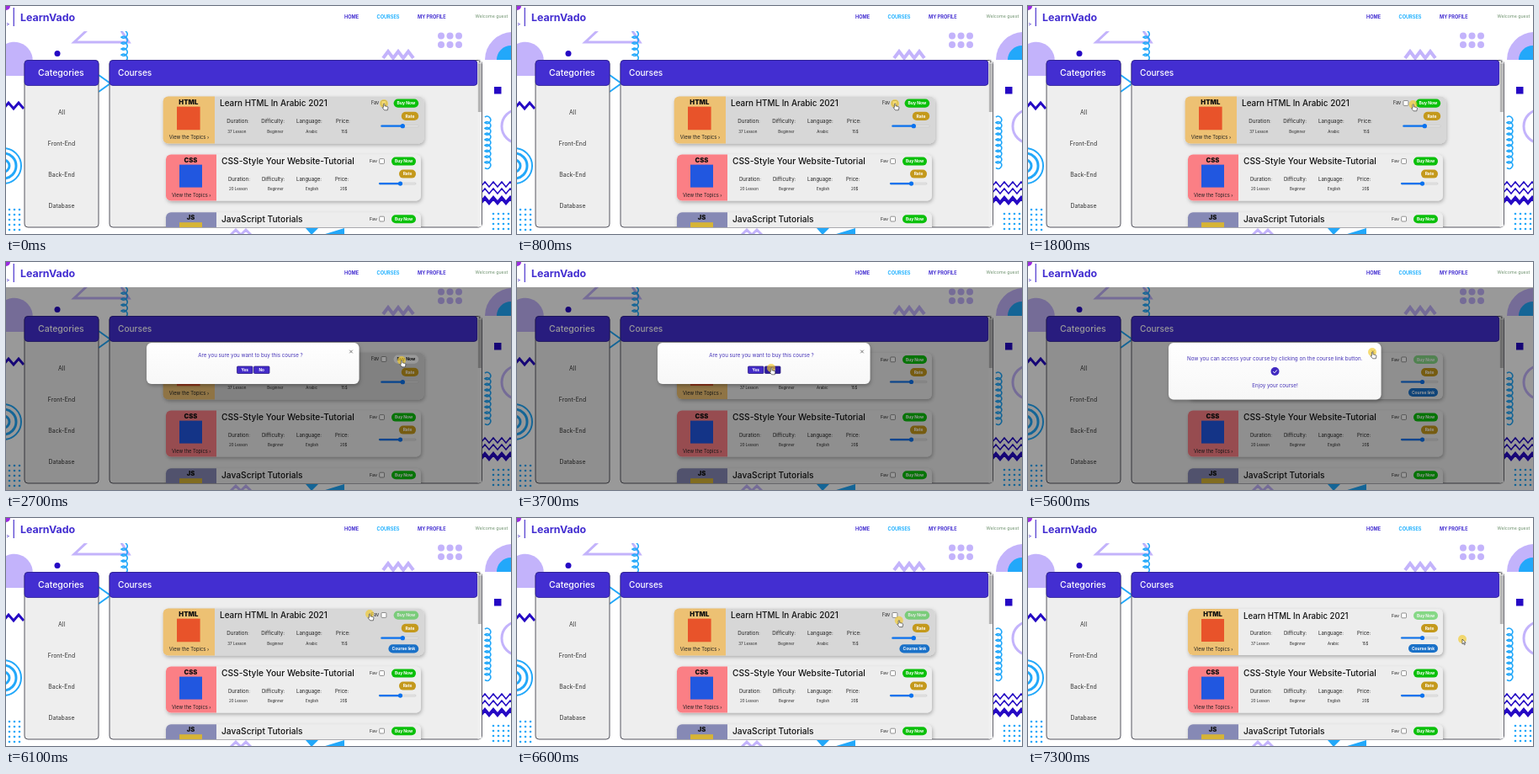
Write an HTML page that moves like this. It is 600 px wide and 271 px high and loops after 7.4 s.

```html
<!DOCTYPE html>
<html lang="en">
<head>
<meta charset="utf-8">
<title>Course page</title>
<style>
html, body { margin: 0; width: 100%; height: 100%; overflow: hidden; background: #fff; }
svg { display: block; width: 100vw; height: 100vh; }
text { font-family: Inter, "Open Sans", sans-serif; }
</style>
</head>
<body>
<svg id="stage" viewBox="0 0 600 271" preserveAspectRatio="none" xmlns="http://www.w3.org/2000/svg"></svg>
<script>
const LOOP = 7400, STEP = 100;
const PURPLE = '#432ed1', LAVENDER = '#c3b3fb', CYAN = '#22a8fa', NAVY = '#2509c4';

const rect = (x, y, w, h, fill, r = 0, extra = '') =>
  `<rect x="${x}" y="${y}" width="${w}" height="${h}" rx="${r}" fill="${fill}" ${extra}/>`;
const text = (s, x, y, size, fill = '#222', extra = '') =>
  `<text x="${x}" y="${y}" font-size="${size}" fill="${fill}" ${extra}>${s}</text>`;
const mid = (s, x, y, size, fill, extra = '') => text(s, x, y, size, fill, `text-anchor="middle" ${extra}`);
const line = (d, color, width = 2, extra = '') =>
  `<path d="${d}" fill="none" stroke="${color}" stroke-width="${width}" ${extra}/>`;
const shape = (d, fill) => `<path d="${d}" fill="${fill}"/>`;
const ring = (x, y, r, color, width) =>
  `<circle cx="${x}" cy="${y}" r="${r}" fill="none" stroke="${color}" stroke-width="${width}"/>`;
const BOLD = 'font-weight="700"', MEDIUM = 'font-weight="500"';

function pill(label, x, y, w, fill, attrs = '') {
  return `<g ${attrs}>${rect(x, y, w, 10, fill, 5)}${mid(label, x + w / 2, y + 6.7, 4.9, '#fff', BOLD)}</g>`;
}

function dots(x, y, cols, rows, gap = 6, r = 1.3, color = CYAN) {
  let out = '';
  for (let i = 0; i < cols * rows; i++)
    out += `<circle cx="${x + i % cols * gap}" cy="${y + Math.floor(i / cols) * gap}" r="${r}" fill="${color}"/>`;
  return out;
}

function zigzag(x, y, count, dx, dy) {
  let d = `M${x} ${y}`;
  for (let i = 0; i < count; i++) d += `l${dx} ${i % 2 ? dy : -dy}`;
  return d;
}

const coil = (x, y, turns, r) => `M${x} ${y}` + `a${r} ${r} 0 1 1 0 ${r * 1.6}`.repeat(turns);

function background() {
  return rect(0, 0, 600, 271, '#fff') +
    shape('M0 45a22 22 0 0 1 22 38H0z', LAVENDER) +
    line('M97 28L81 43H146L136 28', LAVENDER, 3) +
    `<circle cx="61" cy="56.5" r="3.5" fill="${NAVY}"/>` +
    line(coil(137, 30, 5, 4.4), CYAN, 1.6) +
    line('M110 82L124 92L110 102', CYAN, 2) +
    line(zigzag(-3, 122, 4, 6, 7), NAVY, 3) +
    ring(-3, 190, 7, CYAN, 3) + ring(-3, 190, 15, CYAN, 3) + ring(-3, 190, 21, CYAN, 2) +
    dots(4, 242, 3, 5) +
    line(zigzag(267, 272, 4, 6, 6), LAVENDER, 3) +
    shape('M356 264H371L363 272zM376 272L402 264V272z', CYAN) +
    line(zigzag(448, 62, 6, 6, 8), LAVENDER, 4) +
    dots(517, 35.5, 3, 2, 10.5, 4, LAVENDER) +
    shape('M569 64a33 33 0 0 1 33 -33V64z', LAVENDER) +
    shape('M583 64a17 17 0 0 1 17 -17V64z', CYAN) +
    rect(580, 96, 8.5, 8.5, NAVY) +
    ring(609, 143, 20, LAVENDER, 3) +
    line(coil(569, 132, 9, 4.2), CYAN, 1.6) +
    line(zigzag(564, 215, 8, 5, 6), NAVY, 1.5) +
    line(zigzag(564, 223, 8, 5, 6), NAVY, 1.5) +
    line(zigzag(564, 234, 8, 5, 6), NAVY, 4) +
    dots(579, 247, 4, 4);
}

function header() {
  const nav = [['HOME', 402, PURPLE], ['COURSES', 440.5, '#1fb0ff'], ['MY PROFILE', 489, PURPLE]];
  return rect(0, 0, 600, 30, '#fff') +
    shape('M0 0H5a5 5 0 0 1 -5 5z', '#9c2be0') + text('s&gt;', -3, 24, 6, NAVY) +
    rect(8.7, 2, 1, 22, NAVY) +
    text('LearnVado', 17, 18, 12.4, PURPLE, BOLD) +
    nav.map(([s, x, c]) => text(s, x, 14.7, 5.6, c, BOLD)).join('') +
    text('Welcome guest', 557.5, 14.2, 5.3, '#6d916d');
}

function panel(x, w, headW, title, titleX, size) {
  return rect(x, 64.5, w, 198.5, '#eeeeee', 4, 'stroke="#55555f" stroke-width="1"') +
    rect(x, 64.5, headW, 30, PURPLE, 4, 'stroke="#2b1d96" stroke-width=".8"') +
    text(title, titleX, 83.2, size, '#fff', MEDIUM);
}

// Laid out for the first row; later rows are shifted down.
function card(c, dy, id) {
  const labels = [['Duration:', 264, 265, c.lessons], ['Difficulty:', 304, 311, 'Beginner'],
    ['Language:', 345, 356, c.language], ['Price:', 391, 397, c.price]];
  return `<g transform="translate(0 ${dy})"><g id="${id}">` +
    rect(190, 108, 303, 55, '#ededed', 6, 'class="face" filter="url(#shadow)"') +
    shape('M250 108H196a6 6 0 0 0 -6 6V157a6 6 0 0 0 6 6H250z', c.panel) +
    mid(c.name, 219.5, 117.3, 7.6, '#111', 'font-weight="900"') +
    rect(206, 120, 27, 27, c.mark) +
    text('View the Topics ›', 197, 158, 5.7) +
    text(c.title, 256, 119.8, c.size, '#111', MEDIUM) +
    labels.map(([s, x, vx, v]) => text(s, x, 139, 6.05) + text(v, vx, 150.8, 4.45)).join('') +
    text('Fav', 432, 117.8, 5.4) +
    rect(443.7, 113, 5.8, 5.8, '#fff', 1, 'stroke="#666" stroke-width=".7"') +
    pill('Buy Now', 458, 111, 29, '#0bc00b', 'class="buy"') +
    pill('Rate', 467, 126, 20, '#c4991c') +
    rect(443, 141.4, 44, 2.2, '#e4e4e4', 1.1, 'stroke="#bbb" stroke-width=".4"') +
    rect(443, 141.4, 25, 2.2, '#0b72ee', 1.1) +
    '<circle cx="468.5" cy="142.5" r="2.6" fill="#0b72ee"/>' +
    (id === 'first' ? pill('Course link', 452, 150, 35, '#1a71c8', 'class="link"') : '') +
    '</g></g>';
}

const courses = [
  { name: 'HTML', title: 'Learn HTML In Arabic 2021', size: 9.65, panel: '#edc173', mark: '#e8532a',
    lessons: '37 Lesson', language: 'Arabic', price: '15$' },
  { name: 'CSS', title: 'CSS-Style Your Website-Tutorial', size: 10.2, panel: '#fb7f85', mark: '#2157e0',
    lessons: '20 Lesson', language: 'English', price: '20$' },
  { name: 'JS', title: 'JavaScript Tutorials', size: 10.2, panel: '#8689b5', mark: '#d6b436',
    lessons: '30 Lesson', language: 'English', price: '20$' }
];

function modalBox(id, h, content) {
  return `<g id="${id}">${rect(167, 96, 252.5, h, 'url(#paper)', 6, 'filter="url(#shadow)"')}` +
    `${line('M408.2 104.7l3.6 3.6m0 -3.6l-3.6 3.6', '#777', 1)}${content}</g>`;
}

const answer = (id, label, x) =>
  rect(x, 124, 18.5, 8.5, '#432bc8', 1, `id="${id}" stroke="#241579" stroke-width=".7"`) +
  mid(label, x + 9.25, 130, 4.7, '#fff', BOLD);

const INK = '#4634b8';
const stage = document.getElementById('stage');
stage.innerHTML = `<defs>
  <filter id="shadow" x="-10%" y="-20%" width="120%" height="150%">
    <feDropShadow dx="1" dy="2" stdDeviation="2" flood-opacity=".28"/></filter>
  <linearGradient id="paper" x2="0" y2="1"><stop stop-color="#fff"/><stop offset="1" stop-color="#f7f7f7"/></linearGradient>
  <clipPath id="list"><rect x="123" y="95" width="437" height="168"/></clipPath></defs>` +
  background() +
  panel(22, 88, 88, 'Categories', 38, 10.5) +
  [['All', 128.6], ['Front-End', 165.6], ['Back-End', 202.8], ['Database', 240.4]]
    .map(([s, y]) => mid(s, 66, y, 6.9, '#333')).join('') +
  panel(123, 442.5, 437, 'Courses', 133, 10.1) +
  rect(560.3, 65, 4.8, 197.5, '#f1f1f1') + rect(560.8, 68, 3.8, 58, '#b5b5b5') +
  shape('M561.2 67l1.5 -1.7l1.5 1.7z', '#555') +
  `<g clip-path="url(#list)">${courses.map((c, i) => card(c, i * 68.6, ['first', 'second', 'third'][i])).join('')}</g>` +
  rect(0, 30, 600, 241, '#000', 0, 'id="shade" opacity=".4"') +
  header() +
  modalBox('confirm', 49, mid('Are you sure you want to buy this course ?', 290.5, 112.7, 6.2, INK) +
    answer('yes', 'Yes', 274.5) + answer('no', 'No', 294.5)) +
  modalBox('success', 67.5, mid('Now you can access your course by clicking on the course link button.', 293.3, 117.3, 6.25, INK) +
    `<circle cx="293.5" cy="130" r="5" fill="#4029c0"/>` + line('M291.2 130.1l1.7 1.7l3 -3.4', '#fff', 1) +
    mid('Enjoy your course!', 293.5, 148.6, 6.2, INK)) +
  `<g id="pointer"><circle r="5" fill="#f3cb2c" opacity=".66"/>
    <path id="hand" d="M-.6 .3q.8 -.9 1.5 0v2.5l3.2 .7q1 .4 .8 1.5l-.6 2.8h-3.7l-2.5 -3q.1 -1 1.3 -.3z" fill="#fff" stroke="#222" stroke-width=".6"/>
    <path id="arrow" d="M0 0v5.8l1.4 -1.2l1 2.2l.9 -.4l-1 -2.1h1.8z" fill="#fff" stroke="#222" stroke-width=".6"/></g>`;

const $ = selector => stage.querySelector(selector);
const show = (selector, on) => $(selector).setAttribute('display', on ? 'inline' : 'none');
const between = (t, a, b) => t >= a && t < b;

// Pointer stops: time, x, y.
const route = [[0, 449, 116], [1400, 449, 116], [1800, 457.5, 117], [2100, 470, 117], [2800, 470, 117],
  [3400, 302, 126], [3900, 302, 126], [4300, 470, 117], [4700, 470, 117], [5000, 285, 128],
  [5200, 285, 128], [5500, 409, 107], [5700, 409, 107], [6100, 432, 114], [6400, 432, 114],
  [7000, 516, 144], [LOOP, 516, 144]];

function pointerAt(t) {
  const i = route.findIndex(stop => stop[0] > t);
  const [t0, x0, y0] = route[i - 1], [t1, x1, y1] = route[i];
  const p = (t - t0) / (t1 - t0), k = p * p * (3 - 2 * p);
  return [x0 + (x1 - x0) * k, y0 + (y1 - y0) * k];
}

function render(t) {
  const [x, y] = pointerAt(t);
  const asking = between(t, 2500, 3800) || between(t, 4500, 5100);
  const done = between(t, 5100, 5700), bought = t >= 5100;
  const open = asking || done;
  const hover = between(x, 190, 493) && between(y, 108, 163) && !(open && x < 420);
  const overBuy = hover && !bought && between(x, 461, 490) && between(y, 111, 122);

  show('#shade', open);
  show('#confirm', asking);
  show('#success', done);
  show('#first .link', bought);
  $('#first').setAttribute('transform',
    hover ? 'translate(341.5 135.5) scale(1.022) translate(-341.5 -135.5)' : '');
  $('#first .face').setAttribute('fill', hover ? '#d7d7d7' : '#ededed');
  $('#first .buy').setAttribute('opacity', bought ? .45 : 1);
  $('#first .buy rect').setAttribute('fill', overBuy ? '#fff' : '#0bc00b');
  $('#first .buy text').setAttribute('fill', overBuy ? '#111' : '#fff');
  const onButtons = asking && between(y, 124, 133);
  $('#yes').setAttribute('fill', onButtons && between(x, 274, 294) ? '#2c1b9c' : '#432bc8');
  $('#no').setAttribute('fill', onButtons && between(x, 294, 314) ? '#2c1b9c' : '#432bc8');
  $('#pointer').setAttribute('transform', `translate(${x} ${y})`);
  show('#hand', x < 493);
  show('#arrow', x >= 493);
}

const start = performance.now();
function tick() {
  const t = (performance.now() - start) % LOOP;
  render(Math.floor(t / STEP) * STEP);
  requestAnimationFrame(tick);
}
tick();
</script>
</body>
</html>
```
